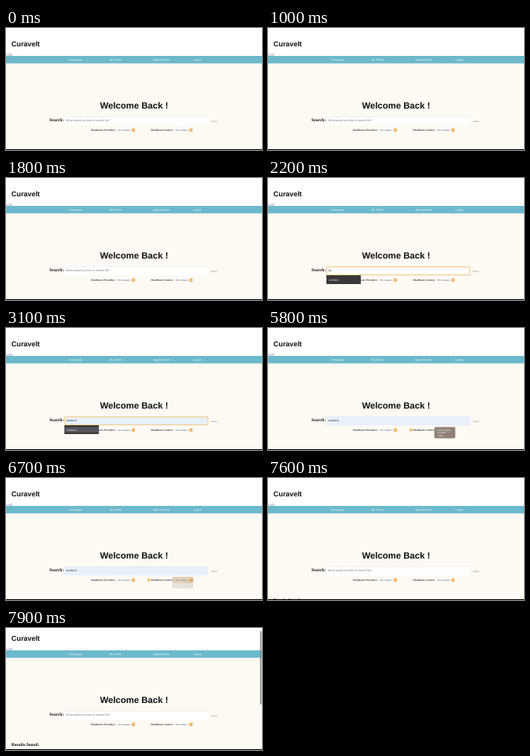
Write an HTML page with a canvas that moves like this. It is 320x153 px and loops after 8000 ms.

```html
<!DOCTYPE html>
<html lang="en">
<head>
<meta charset="utf-8">
<title>Health search</title>
<style>
  html, body { margin: 0; width: 100%; height: 100%; overflow: hidden; background: #fff; }
  canvas { display: block; width: 320px; height: 153px; }
</style>
</head>
<body>
<canvas id="stage"></canvas>
<script>
const W = 320, H = 153, LOOP = 8000;
const SANS = '"Liberation Sans", Arial, sans-serif';
const SERIF = '"Liberation Serif", "Times New Roman", serif';
const ORANGE = '#f1b050';

const canvas = document.getElementById('stage');
const ctx = canvas.getContext('2d');
const dpr = window.devicePixelRatio || 1;
canvas.width = W * dpr;
canvas.height = H * dpr;
ctx.textRendering = 'geometricPrecision';

function text(str, x, y, size, color, family = SANS, weight = 400) {
  ctx.font = `${weight} ${size}px ${family}`;
  ctx.fillStyle = color;
  ctx.fillText(str, x, y);
}

function rect(x, y, w, h, color) {
  ctx.fillStyle = color;
  ctx.fillRect(x, y, w, h);
}

function box(x, y, w, h, r, fill, stroke, line = 0.5) {
  ctx.beginPath();
  ctx.roundRect(x, y, w, h, r);
  if (fill) { ctx.fillStyle = fill; ctx.fill(); }
  if (stroke) { ctx.strokeStyle = stroke; ctx.lineWidth = line; ctx.stroke(); }
}

const within = (t, a, b) => t >= a && t < b;

function header() {
  rect(0, 0, W, 35, '#fff');
  text('Curavelt', 6.8, 23, 8.9, '#111', SANS, 700);
  text('Login', 0, 34.3, 3.5, '#7f78a8', SERIF);
  rect(0, 34.6, 8, 0.3, '#a9a2cc');
  rect(0, 35, W, 9.4, '#6cb9cc');
  [['Homepage', 78.5], ['My Profile', 129.5], ['Appointments', 184], ['Logout', 234]]
    .forEach(([label, x]) => text(label, x, 41.4, 3.35, '#f4fbfc'));
}

function checkbox(x, checked) {
  box(x, 126.3, 3, 3, 0.6, checked ? ORANGE : '#fff', checked ? ORANGE : '#f0ebe4', 0.3);
  if (!checked) return;
  ctx.beginPath();
  ctx.moveTo(x + 0.7, 127.9);
  ctx.lineTo(x + 1.3, 128.6);
  ctx.lineTo(x + 2.3, 126.9);
  ctx.strokeStyle = '#fff';
  ctx.lineWidth = 0.4;
  ctx.stroke();
}

function select(x, focused) {
  box(x, 125.2, 24, 5.6, 1.3, '#fff', focused ? null : '#f5f1eb', 0.3);
  if (focused) box(x - 1, 124.8, 25, 6.2, 1.5, '#f8ecd6', '#e6c890', 0.7);
  text('Pick category', x + 1.7, 128.9, 2.7, '#444');
  box(x + 19.2, 125.8, 4, 4.4, 1, ORANGE);
  ctx.beginPath();
  for (const s of [-1, 1]) {
    ctx.moveTo(x + 20.3, 128 + s * 0.5);
    ctx.lineTo(x + 21.2, 128 + s * 1.4);
    ctx.lineTo(x + 22.1, 128 + s * 0.5);
  }
  ctx.strokeStyle = '#fff';
  ctx.lineWidth = 0.45;
  ctx.stroke();
}

function searchField(t) {
  const focused = within(t, 1900, 4600);
  const filled = within(t, 2800, 7600);
  const typed = filled ? 'randwick' : within(t, 2200, 2800) ? 'ra' : '';
  text('Search:', 54.3, 117.4, 5.5, '#111', SERIF, 700);
  rect(73, 111, 179.5, 11, filled ? '#e8f0fe' : '#fff');
  if (focused) box(73.5, 111.5, 179, 10, 0.5, null, '#f0cb85', 1);
  else rect(73, 111, 179.5, 0.4, '#dfdfe0');

  if (typed) text(typed, 75, 117.3, 3.4, '#333');
  else text('What would you like to search for?', 75, 117.3, 3.6, '#777');

  const caretOn = focused && !within(t, 2800, 3400) && !within(t, 3900, 4400);
  if (caretOn) {
    ctx.font = `400 3.4px ${SANS}`;
    rect(75.1 + ctx.measureText(typed).width, 114, 0.3, 4, '#444');
  }
  text('Search', 256, 117.6, 2.5, within(t, 7200, 7400) ? '#333' : '#777');
}

function suggestion(t) {
  if (!within(t, 2200, 3400)) return;
  rect(73, 122, 43, 11, '#3a3838');
  if (t >= 2800) rect(73.5, 124.2, 42, 6.8, '#55555a');
  text('randwick', 76, 128.5, 3.1, '#f2f2f2');
}

function menu(t) {
  if (!within(t, 5300, 6800)) return;
  ctx.globalAlpha = Math.min(1, 1 - (t - 6300) / 500);
  box(208, 124.3, 26, 13.9, 1.6, '#8f8277', '#b5a696', 0.5);
  if (within(t, 6000, 6300)) box(209, 129.5, 24, 3.5, 0.6, '#bd9157');
  ['Pick category', 'Hospital', 'Clinic'].forEach((item, i) =>
    text(item, 212.5, 128.6 + i * 3.5, 2.7, '#fff'));
  text('✓', 209.5, 128.6, 2.5, '#fff');
  ctx.globalAlpha = 1;
}

function page(t) {
  header();
  text('Welcome Back !', 117.4, 101, 11.15, '#111', SANS, 700);
  searchField(t);
  checkbox(102, false);
  text('Healthcare Providers:', 106.3, 129, 3.27, '#333', SERIF, 700);
  select(138, false);
  checkbox(177, within(t, 4700, 7600));
  text('Healthcare Centres:', 181.3, 129, 3.27, '#333', SERIF, 700);
  select(210, within(t, 6300, 7000));
  suggestion(t);
  menu(t);
  if (t >= 7600) text('Results found:', 6.8, 155, 5.6, '#111', SERIF, 700);
}

function draw(t) {
  const scrolled = t >= 7900;
  ctx.setTransform(dpr, 0, 0, dpr, 0, 0);
  rect(0, 0, W, H, '#fdf9f3');
  ctx.save();
  if (scrolled) ctx.translate(0, -7);
  page(t);
  ctx.restore();
  if (scrolled) box(317.6, 4, 1.8, 92, 0.9, '#8f8f8f');
  rect(0, 152, W, 1, '#000');
}

const start = performance.now();
function tick() {
  draw((performance.now() - start) % LOOP);
  requestAnimationFrame(tick);
}
tick();
</script>
</body>
</html>
```
